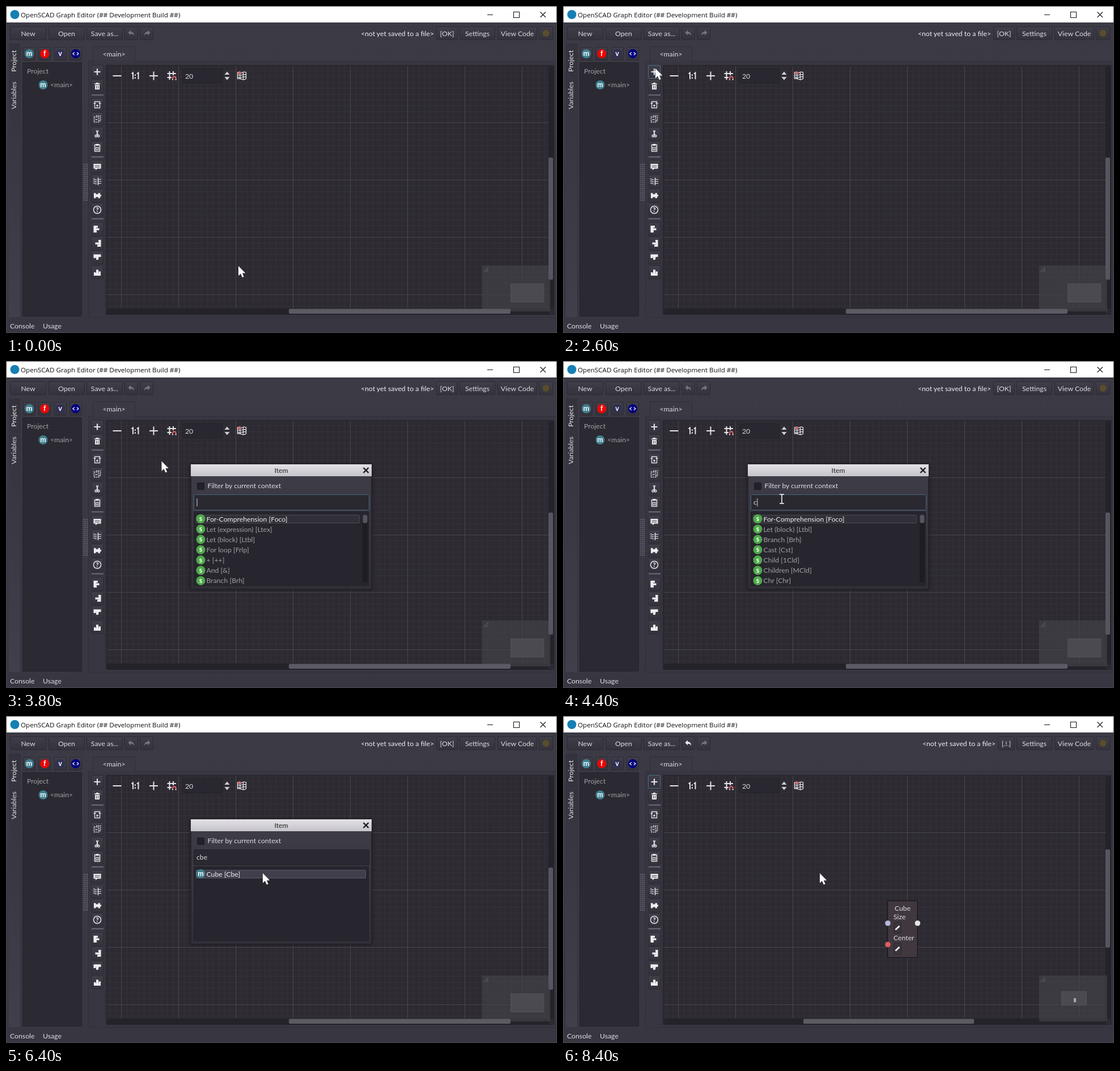
Write an HTML page that moves like this. It is 972 px wide and 576 px high and loops after 9200 ms.

```html
<!DOCTYPE html>
<html lang="en">
<head>
<meta charset="utf-8">
<title>Graph editor</title>
<style>
  html, body { margin: 0; width: 100%; height: 100%; overflow: hidden; background: #383641; }
  svg { display: block; width: 972px; height: 576px; }
  text { font: 12.25px Lato, sans-serif; fill: #dddce0; white-space: pre; }
  .mid { text-anchor: middle; }
  .end { text-anchor: end; }
  .dim { fill: #a3a1a7; }
  .lit { fill: #f0eff2; }
  .bold { font-weight: 700; fill: #fff; }
  .title { font: 11.65px "Open Sans", sans-serif; fill: #111; }
  .line { fill: none; stroke: #e4e3e7; stroke-width: 1.5; }
</style>
</head>
<body>
<svg id="stage" viewBox="0 0 972 576" xmlns="http://www.w3.org/2000/svg"></svg>
<script>
const LOOP = 9200, TICK = 200;
const esc = s => s.replace(/&/g, '&amp;').replace(/</g, '&lt;');

const rect = (x, y, w, h, fill, more = '') =>
  `<rect x="${x}" y="${y}" width="${w}" height="${h}" fill="${fill}" ${more}/>`;
const box = (x, y, w, h, fill, stroke, rx = 1, more = '') =>
  rect(x + .5, y + .5, w - 1, h - 1, fill, `stroke="${stroke}" rx="${rx}" ${more}`);
const text = (x, y, s, cls = '', more = '') =>
  `<text x="${x}" y="${y}" class="${cls}" ${more}>${esc(s)}</text>`;
const path = (d, more = '') => `<path d="${d}" class="line" ${more}/>`;
const solid = (d, fill = '#efeff1') => `<path d="${d}" fill="${fill}"/>`;
const dot = (x, y, r, fill, more = '') => `<circle cx="${x}" cy="${y}" r="${r}" fill="${fill}" ${more}/>`;
const at = (x, y, s, more = '') => `<g transform="translate(${x} ${y})" ${more}>${s}</g>`;
const group = (id, s) => `<g id="${id}">${s}</g>`;
const fade = (id, a, b) =>
  `<linearGradient id="${id}" x2="0" y2="1"><stop stop-color="${a}"/><stop offset="1" stop-color="${b}"/></linearGradient>`;

const button = (x, w, label = '') =>
  box(x, 36, w, 24, 'url(#btn)', '#2c2a33') + text(x + w / 2, 52.5, label, 'mid');
const badge = (x, y, ch, fill) =>
  dot(x, y, 8, fill) + text(x, y + 4, ch, 'mid bold', 'style="font-size:12.5px"');

function frame() {
  return rect(0, 0, 972, 576, 'url(#bg)') + rect(0, 0, 972, 29, '#fff') +
    box(0, 0, 972, 576, 'none', '#4a494f', 0) +
    dot(15.5, 15, 8, '#167fb4') +
    text(26, 19.5, 'OpenSCAD Graph Editor (## Development Build ##)', 'title') +
    path('M849 15.5H859M895.5 10.5H905.5V20.5H895.5ZM942.5 10.5L952 20M952 10.5L942.5 20',
      'style="stroke:#151515;stroke-width:1.1"') +
    button(7, 64, 'New') + button(75, 64, 'Open') + button(142, 64, 'Save as...') +
    button(209, 24) + button(236, 24) + button(800, 63, 'Settings') +
    button(867, 70, 'View Code') + button(940, 25) + dot(952.5, 48, 6, '#594d2c') +
    at(249, 48, solid('M5.5-1L1-5.5V-2.5C-3-2.5-5 0-5 4.5C-3.5 1.5-2 .8 1 .8V3.5Z', '#77757d')) +
    text(7, 568, 'Console') + text(65, 568, 'Usage');
}

const undo = fill => at(221, 48, solid('M-5.5-1L-1-5.5V-2.5C3-2.5 5 0 5 4.5C3.5 1.5 2 .8-1 .8V3.5Z', fill));

function sidebar() {
  const side = (y, s, cls) => text(0, 0, s, 'mid ' + cls, `transform="translate(17.5 ${y}) rotate(-90)"`);
  let s = rect(5, 66, 21, 482, 'url(#strip)') + rect(25, 67, 1, 481, '#34323c') +
    side(97, 'Project', 'lit') + side(157.5, 'Variables');
  [['m', '#3f7f90'], ['f', '#ee0505'], ['v', '#303054'], ['<>', '#000080']].forEach(([ch, fill], i) => {
    const x = 41 + i * 27.3;
    s += box(Math.round(x - 11), 72, 22, 24, 'url(#btn)', '#2c2a33');
    s += ch.length > 1
      ? dot(x, 84, 8, fill) + path(`M${x - 2} 81.5l-3 2.5l3 2.5M${x + 2} 81.5l3 2.5l-3 2.5`)
      : badge(x, 84, ch, fill);
  });
  s += box(29, 99, 105, 448, '#2b2932', '#25232b') + text(37, 119, 'Project', 'dim') +
    badge(65.5, 139, 'm', '#3f7f90') + text(78, 143, '<main>', 'dim');
  for (let y = 278; y < 343; y += 3.5)
    for (const x of [137, 140, 143]) s += rect(x - .3, y, 1.6, 1.8, '#74727d');
  return s;
}

function toolbar() {
  const page = path('M-4.5-5.5H4.5V5.5H-4.5Z', 'style="stroke-width:1.3"');
  const links = path('M-6.5-2.5H-2.5M2.5-2.5H6.5M-2 1.5H2M0-.5V3.5', 'style="stroke-width:1.3"');
  const bars = d => solid(d);
  const icons = [
    [116, path('M-5.5 0H5.5M0-5.5V5.5', 'style="stroke-width:2.2"')],
    [141, solid('M-5-4.5H-2V-6H2V-4.5H5V-3H-5ZM-4-2H4V6H-4Z') +
      path('M-1.5-.5V4.5M1.5-.5V4.5', 'style="stroke:#383640;stroke-width:1"')],
    [174, page + links],
    [199, path('M-5.5-3.5H2.5V5.5H-5.5Z', 'stroke-dasharray="2 1.3"') +
      path('M-2-5.5H5.5V3.5H3', 'stroke-dasharray="2 1.3"') + path('M-3.5 1H.5', 'style="stroke-width:1.3"')],
    [225, path('M-1.5-6L1 2M1.5-6L-1 2') + dot(-2.2, 4, 1.7, 'none', 'class="line"') +
      dot(2.2, 4, 1.7, 'none', 'class="line"')],
    [250, path('M-4.5-5.5H4.5V6H-4.5Z', 'stroke-linejoin="round"') + solid('M-2.5-7H2.5V-4H-2.5Z') +
      path('M-2.5-1H2.5V3.5H-2.5ZM0-1V3.5', 'style="stroke-width:1.1"')],
    [283, solid('M-6.5-5H6.5V3.5H0L-3 6.5V3.5H-6.5Z') +
      path('M-4.5-2H4.5M-4.5 .8H4.5', 'style="stroke:#383640;stroke-width:1"')],
    [309, [-3.5, 0, 3.5].map(y => path(`M-7 ${y}q1.5-2 3 0t3 0M1 ${y}H7`, 'style="stroke-width:1.2"')).join('') +
      path('M1.5-6.5V6.5', 'style="stroke-width:1.6"')],
    [334, solid('M-6-4.5H-2.5V-2.5H1.5V-4.5H5V-1.5H7V1.5H5V4.5H1.5V2.5H-2.5V4.5H-6Z')],
    [359, dot(0, 0, 6.5, 'none', 'class="line"') + text(0, 4, '?', 'mid bold', 'style="font-size:11px"')],
    [393, bars('M-6.5-6H1V-2.5H-2V-1.5H3.5V2H-2V2.5H-1V6H-6.5Z')],
    [418, bars('M6.5-6H2V-2.5H3V-1.5H-3.5V2H3V2.5H0V6H6.5Z')],
    [443, bars('M-6.5-5.5H6.5V-1H3V1H2.5V-1H2V4H-2V-1H-2.5V1H-6.5Z')],
    [469, bars('M-6 6V0H-2.5V2H-2V-4.5H2V2H2.5V-1.5H6V6Z')]
  ];
  return icons.map(([y, s]) => box(150, y - 12, 22, 24, 'url(#btn)', '#2c2a33') + at(161, y, s)).join('') +
    [157, 266, 375].map(y => rect(151, y - 1, 21, 1.5, '#77757f')).join('');
}

function graph() {
  let minor = '', major = '';
  for (let i = -3; i < 76; i++) minor += `M${Math.round(203 + i * 10.1) + .5} 106V532`;
  for (let i = -9; i < 34; i++) minor += `M178 ${Math.round(205 + i * 10.1) + .5}H957`;
  for (let i = 0; i < 8; i++) major += `M${203.5 + i * 101} 106V532`;
  for (let i = 0; i < 4; i++) major += `M178 ${205.5 + i * 101}H957`;
  const icon = 'style="stroke-width:2"';
  return box(145, 97, 824, 452, '#383641', '#302e37') +
    box(153, 71, 75, 28, '#3b3944', '#302e37') + rect(154, 96, 73, 4, '#393742') +
    text(190.5, 88.5, '<main>', 'mid') +
    box(176, 104, 791, 440, '#2d2a32', '#242229') +
    path(minor, 'style="stroke:#33313a;stroke-width:1"') +
    path(major, 'style="stroke:#47454d;stroke-width:1"') +
    at(196, 123, path('M-7.5 0H7.5', icon)) +
    at(228, 123, path('M-6.5-3.5L-4-5.5V6M3-3.5L5.5-5.5V6', icon) +
      solid('M-1.2-2.5H1V-.3H-1.2ZM-1.2 2.5H1V4.7H-1.2Z')) +
    at(260.5, 123, path('M-7.5 0H7.5M0-7.5V7.5', icon)) +
    at(292, 123, path('M-3.5-8V7M3-8V-1M-7.5-4H8M-7.5 3H0', icon) +
      path('M2 7V4A2.8 2.8 0 0 1 7.6 4V7', 'style="stroke:#e0686c;stroke-width:2"') +
      path('M2 5.8V7.6M7.6 5.8V7.6', icon)) +
    box(311, 110, 71, 26, '#29272f', '#232129') + text(316, 127.5, '20') +
    solid('M385.5 121L390 115.5L394.5 121ZM385.5 125L390 130.5L394.5 125Z', '#d0cfd4') +
    at(416, 123, path('M-7.5-6Q-3.5-3 0-5.5T7.5-6V5Q3.5 8 0 6T-7.5 5ZM-7.5-2Q-3.5 0 0-1.5T7.5-2M-7.5 2Q-3.5 4 0 2.5T7.5 2M-3-5V6.5M2.5-6V6.5',
      'style="stroke-width:1.3"') + dot(-4, -5.5, 2.6, '#d8686c')) +
    rect(957, 106, 9, 427, '#25232a', 'rx="3"') + rect(178, 533, 780, 10, '#25232a', 'rx="3"') +
    rect(840, 457, 120, 81, '#45454a', 'opacity=".62"') +
    path('M843 468.5L851 460.5M847.5 468.5L851 465', 'style="stroke:#77767a;stroke-width:1"');
}

const view = (vy, vh, hx, hw, mx, my, mw, mh) =>
  rect(957, vy, 8, vh, '#57555f', 'rx="2"') + rect(hx, 533.5, hw, 8.5, '#5c5a63', 'rx="2"') +
  box(mx, my, mw, mh, '#4b4a50', '#525157', 0);

const before = () => undo('#77757d') + text(755, 52.5, '<not yet saved to a file>', 'end lit') +
  button(759, 38, '[OK]') + view(267, 215, 499, 391, 890, 489, 59, 33);

function after() {
  const edit = y => box(583, y, 14, 20, '#3a343b', '#2a262c') +
    at(590, y + 10, path('M-3.5 3.5L3.5-3', 'style="stroke:#fff;stroke-width:2.6"'));
  return undo('#efeff1') + text(763, 52.5, '<not yet saved to a file>', 'end lit') +
    button(767, 30, '[.!.]') + view(235, 173, 424, 301, 879, 485, 45, 25) +
    rect(901, 497, 4, 7, '#aaa8ac') +
    box(572, 325, 54, 101, '#41383f', '#1b191f', 2, 'stroke-width="1.6"') +
    text(599, 342.5, 'Cube', 'mid') + text(583, 357.5, 'Size') + text(583, 395, 'Center') +
    edit(363) + edit(400) +
    dot(573, 365, 4.8, '#b6b6de') + dot(625.5, 365, 4.8, '#e4e4e6') + dot(573, 402.5, 4.8, '#e05c60');
}

function list(names, ch, fill, w, over = '') {
  return box(335, 271, w, 15, '#312f37', '#4b4952') + over +
    names.map((s, i) => {
      const y = 278 + i * 18.15;
      return badge(343.5, y, ch, fill) + text(353.5, y + 4.5, s, i ? 'dim' : 'lit');
    }).join('') +
    (names.length > 1 ? rect(629, 271, 9, 119, '#1f1d24', 'rx="3"') + rect(629.5, 271, 8, 14.5, '#56545d', 'rx="3"') : '');
}

function popup() {
  const first = 'For-Comprehension [Foco]', green = '#4fa84b';
  return rect(325, 182, 321, 221, '#15141a', 'filter="url(#soft)" opacity=".7"') +
    box(326, 182, 319, 220, 'url(#pop)', '#26242b') + rect(326, 182, 319, 21, 'url(#bar)') +
    text(485.5, 197, 'Item', 'mid', 'style="fill:#222"') +
    at(635, 192.5, path('M-4.5-4.5L4.5 4.5M4.5-4.5L-4.5 4.5', 'style="stroke:#1c1b20;stroke-width:2.4"')) +
    box(337, 214, 13, 13, '#232128', '#1d1b22') + text(355.5, 224, 'Filter by current context') +
    box(331, 235, 310, 28, '#2a2830', '#24222a') +
    group('focus', box(331, 235, 310, 28, 'none', '#44677c')) +
    text(336, 253, '', '', 'id="query"') + rect(0, 242, 1, 14, '#dddce0', 'id="caret"') +
    box(331, 265, 309, 131, '#27252d', '#222027') +
    group('all', list([first, 'Let (expression) [Ltex]', 'Let (block) [Ltbl]', 'For loop [Frlp]',
      '+ [++]', 'And [&]', 'Branch [Brh]'], 's', green, 289)) +
    group('some', list([first, 'Let (block) [Ltbl]', 'Branch [Brh]', 'Cast [Cst]',
      'Child [1Cld]', 'Children [MCld]', 'Chr [Chr]'], 's', green, 289)) +
    group('one', list(['Cube [Cbe]'], 'm', '#3f7f90', 300,
      group('hover', box(335, 271, 300, 15, '#423f4c', '#5a5764')))) +
    group('tip', rect(456, 281, 71, 27, '#111', 'filter="url(#soft)" opacity=".6"') +
      box(456, 281, 70, 26, '#b3b1b5', '#6b6970', 2) + text(461.5, 298.5, 'Cube [Cbe]', '', 'style="fill:#151418"'));
}

const stage = document.getElementById('stage');
stage.innerHTML = '<defs>' + fade('bg', '#3c3b45', '#383641') + fade('btn', '#403e49', '#34323b') +
  fade('strip', '#34323c', '#413f4b') + fade('pop', '#3f3e48', '#302e37') + fade('bar', '#e3e1e6', '#c6c4cb') +
  '<filter id="soft" x="-20%" y="-20%" width="140%" height="140%"><feGaussianBlur stdDeviation="2"/></filter></defs>' +
  frame() + sidebar() + graph() + toolbar() +
  group('press', box(150, 104, 22, 24, 'none', '#4a6c84')) +
  group('before', before()) + group('after', after()) + group('popup', popup()) +
  group('arrow', solid('M0 0V17.2L4 13.5L6.8 20L9.6 18.8L6.9 12.4H12.3Z', '#fff')) +
  group('beam', path('M-4-8H-1L0-7L1-8H4M0-7V7M-4 8H-1L0 7L1 8H4', 'style="stroke:#fff"'));

const el = {};
stage.querySelectorAll('[id]').forEach(n => el[n.id] = n);
const show = (id, on) => el[id].style.display = on ? '' : 'none';

// Pointer moves: first step, last step, destination
const start = [410, 458];
const moves = [[200, 1200, 486, 311], [1800, 2200, 163, 110], [3600, 4200, 386, 243], [5800, 6400, 453, 277]];
const typing = [[0, ''], [4400, 'c'], [4600, 'cb'], [5000, 'cbe']];
const PRESS = 2600, OPEN = 2800, PICK = 6400, TIP = 7000, DONE = 8000;

function pointer(t) {
  let [x, y] = start;
  for (const [a, b, tx, ty] of moves) {
    if (t < a) break;
    const p = Math.min(1, (t - a + TICK) / (b - a + TICK));
    const k = p * p * (3 - 2 * p);
    x += (tx - x) * k;
    y += (ty - y) * k;
  }
  return [x, y];
}

function draw(t) {
  const [x, y] = pointer(t);
  const open = t >= OPEN && t < DONE, done = t >= DONE;
  const query = typing.filter(k => k[0] <= t).pop()[1];
  const overField = open && x > 331 && x < 640 && y > 235 && y < 262;

  show('popup', open);
  show('before', !done);
  show('after', done);
  show('press', done || (t >= PRESS && t < OPEN));
  show('focus', t < PICK);
  show('caret', t < PICK);
  show('all', !query);
  show('some', query === 'c');
  show('one', query.length > 1);
  show('hover', t >= PICK);
  show('tip', t >= TIP);
  show('arrow', !overField);
  show('beam', overField);

  if (el.query.textContent !== query) el.query.textContent = query;
  el.caret.setAttribute('x', 336.5 + (open && query ? el.query.getComputedTextLength() : 0));
  for (const id of ['arrow', 'beam']) el[id].setAttribute('transform', `translate(${x} ${y})`);
}

const origin = performance.now();
function tick() {
  const t = (performance.now() - origin) % LOOP;
  draw(Math.floor(t / TICK) * TICK);
  requestAnimationFrame(tick);
}
tick();
</script>
</body>
</html>
```
